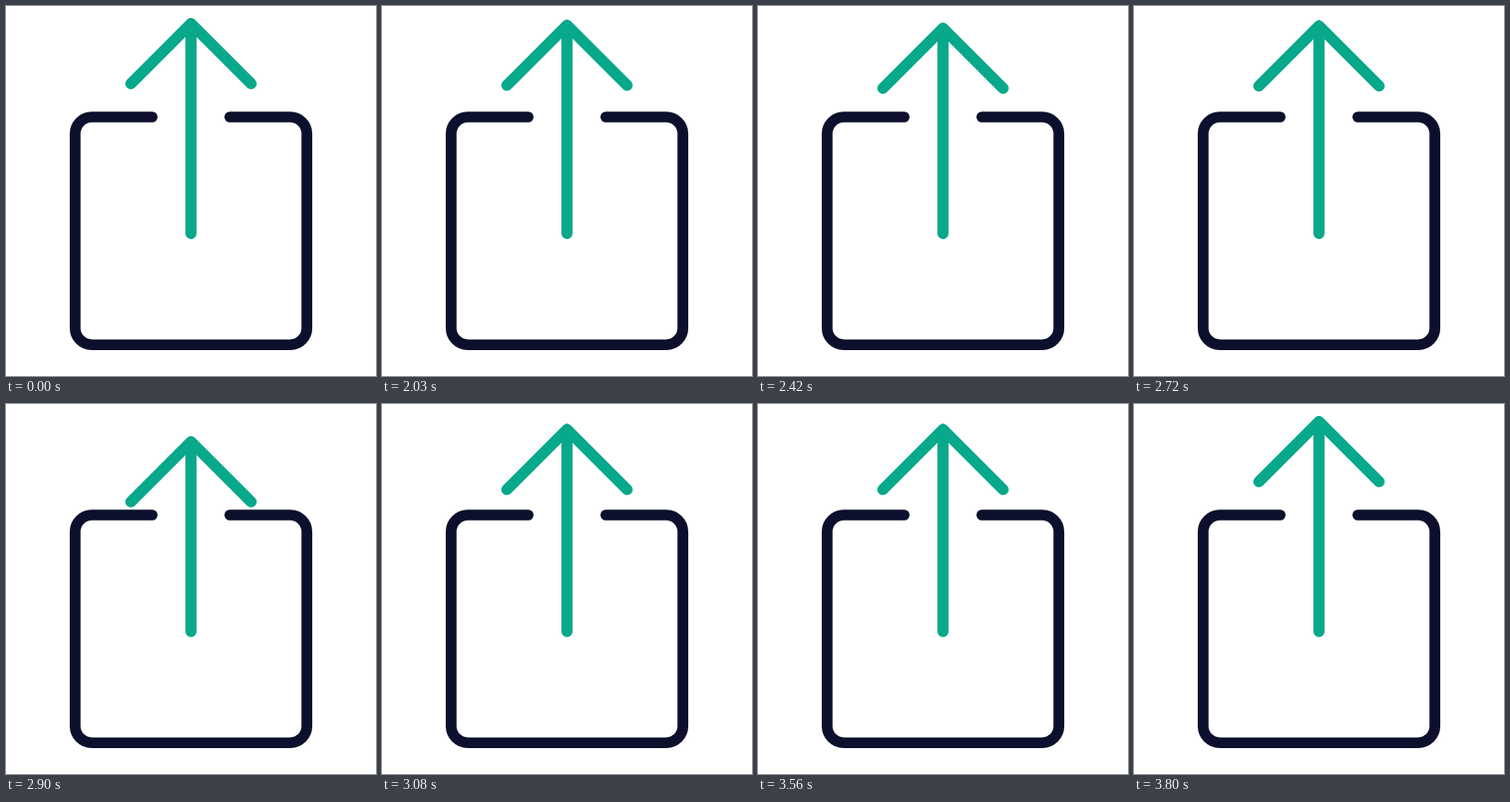
Recreate the animation shown at these times as an HTML page with a canvas. Size 400 by 400 pixels, loop 3.83 s.

```html
<!DOCTYPE html>
<html lang="en">
<head>
<meta charset="utf-8">
<title>Share arrow</title>
<style>
  html, body { margin: 0; width: 100%; height: 100%; overflow: hidden; background: #fff; }
  canvas { display: block; width: 400px; height: 400px; }
</style>
</head>
<body>
<canvas id="stage" width="400" height="400"></canvas>
<script>
const ctx = document.getElementById("stage").getContext("2d");
const LOOP = 3830, REST = 2000, STEP = 30;

// Arrow head bounce: [step, vertical offset]
const KEYS = [[-0.4, 0], [7.5, 22], [19.5, -8], [30.7, 22], [42, -8], [51.5, 8.5], [60, 0]];

const ease = p => (1 - Math.cos(Math.PI * p)) / 2;

function headOffset(ms) {
  const k = Math.floor((ms - REST) / STEP);
  if (k <= 0 || k >= 60) return 0;
  const i = KEYS.findIndex(key => key[0] > k);
  const [t0, y0] = KEYS[i - 1], [t1, y1] = KEYS[i];
  return y0 + (y1 - y0) * ease((k - t0) / (t1 - t0));
}

function stroke(color, width, trace) {
  ctx.strokeStyle = color;
  ctx.lineWidth = width;
  ctx.beginPath();
  trace();
  ctx.stroke();
}

function box() {
  const l = 74.75, r = 325.25, t = 120, b = 366.25, rad = 18;
  ctx.moveTo(158, t);
  ctx.arcTo(l, t, l, b, rad);
  ctx.arcTo(l, b, r, b, rad);
  ctx.arcTo(r, b, r, t, rad);
  ctx.arcTo(r, t, 242, t, rad);
  ctx.lineTo(242, t);
}

function arrow(dy) {
  ctx.moveTo(200, 246);
  ctx.lineTo(200, 19 + dy);
  ctx.moveTo(135, 84 + dy);
  ctx.lineTo(200, 19 + dy);
  ctx.lineTo(265, 84 + dy);
}

function draw(ms) {
  ctx.fillStyle = "#fff";
  ctx.fillRect(0, 0, 400, 400);
  ctx.lineCap = ctx.lineJoin = "round";
  stroke("#0d102c", 11.7, box);
  stroke("#08a88a", 12, () => arrow(headOffset(ms)));
}

const start = performance.now();
function tick() {
  draw((performance.now() - start) % LOOP);
  requestAnimationFrame(tick);
}
tick();
</script>
</body>
</html>
```
